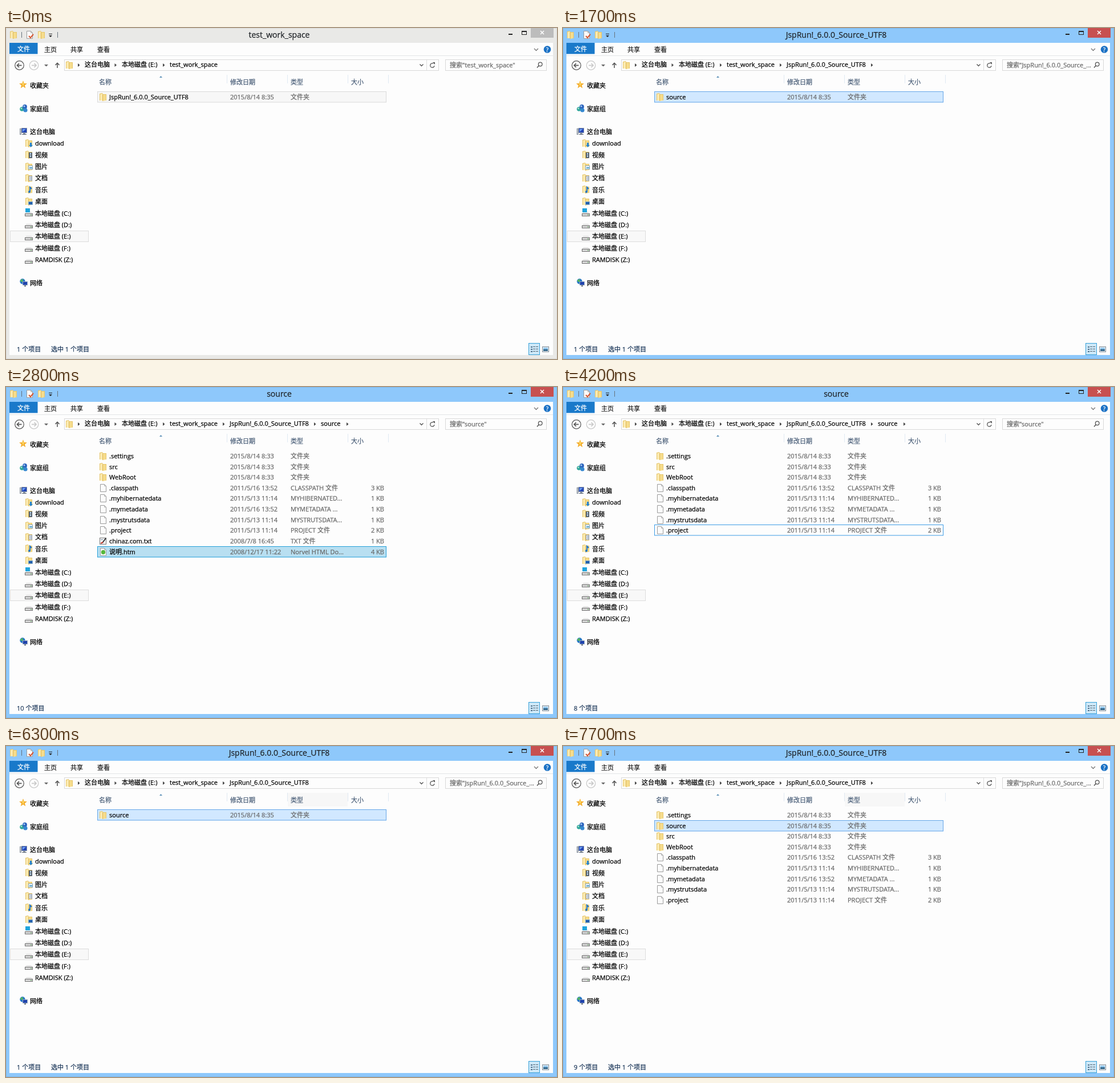
Animation, 966 px wide and 580 px high, one loop 8 s. Source, as an HTML page with a canvas:

```html
<!DOCTYPE html>
<html lang="zh-CN">
<head>
<meta charset="utf-8">
<title>Folder window</title>
<style>
html, body { margin: 0; width: 100%; height: 100%; overflow: hidden; background: #fdfdfd; }
canvas { display: block; width: 966px; height: 580px; }
</style>
</head>
<body>
<canvas id="stage" width="966" height="580"></canvas>
<script>
const g = document.getElementById('stage').getContext('2d');
const FONT = '"Open Sans", "Noto Sans CJK SC", "Noto Sans CJK", "Noto Sans", sans-serif';
const LOOP = 8000;
const PAPER = '#fdfdfd';
const ROW = 18.62;
const DIM = '#686868';

// ---- data ----
const crumbs = ['这台电脑', '本地磁盘 (E:)', 'test_work_space', 'JspRun!_6.0.0_Source_UTF8', 'source'];
const crumbX = [138, 203, 287, 392, 552];
const arrowX = [126, 190.5, 275, 380, 540, 597];

const folder = (name, time) => ({ icon: 'folder', name, date: '2015/8/14 ' + time, type: '文件夹', size: '' });
const file = (name, date, type, kb, icon = 'page') => ({ icon, name, date, type, size: kb + ' KB' });

const project = [folder('JspRun!_6.0.0_Source_UTF8', '8:35')];
const source = [folder('source', '8:35')];
const kept = [
  folder('.settings', '8:33'),
  folder('src', '8:33'),
  folder('WebRoot', '8:33'),
  file('.classpath', '2011/5/16 13:52', 'CLASSPATH 文件', 3),
  file('.myhibernatedata', '2011/5/13 11:14', 'MYHIBERNATED...', 1),
  file('.mymetadata', '2011/5/16 13:52', 'MYMETADATA ...', 1),
  file('.mystrutsdata', '2011/5/13 11:14', 'MYSTRUTSDATA...', 1),
  file('.project', '2011/5/13 11:14', 'PROJECT 文件', 2)
];
const full = [
  ...kept,
  file('chinaz.com.txt', '2008/7/8 16:45', 'TXT 文件', 1, 'note'),
  file('说明.htm', '2008/12/17 11:22', 'Norvel HTML Do...', 4, 'web')
];
const merged = [kept[0], source[0], ...kept.slice(1)];

// fill and border of a highlighted row
const looks = {
  idle: ['#f7f7f7', '#dadada'],
  hover: ['#e5f3fb', '#70c0e7'],
  picked: ['#cbe8f6', '#26a0da'],
  hot: ['#d1e8ff', '#66a7e8'],
  down: ['#b8dff1', '#26a0da'],
  focus: [PAPER, '#3c9be5']
};
const every = (look, count, skip = -1) =>
  Object.fromEntries([...Array(count).keys()].filter(i => i !== skip).map(i => [i, look]));

// each entry changes part of the state from its time on
const script = [
  [0, { active: 0, depth: 3, tail: false, rows: project, marks: { 0: 'idle' }, count: 1, chosen: 1,
        size: '', cut: false, headHover: false, crumbHover: -1 }],
  [200, { marks: { 0: 'hover' } }],
  [300, { marks: { 0: 'hot' } }],
  [500, { active: 0.35, marks: { 0: 'hover' }, chosen: 0 }],
  [600, { active: 0.75 }],
  [700, { active: 1 }],
  [1000, { marks: { 0: 'hot' }, chosen: 1 }],
  [1100, { depth: 4, rows: [], marks: {}, chosen: 0 }],
  [1200, { rows: source, marks: { 0: 'hover' } }],
  [1400, { tail: true }],
  [1700, { marks: { 0: 'hot' }, chosen: 1 }],
  [1800, { depth: 5, tail: false, rows: [], marks: {}, chosen: 0 }],
  [1900, { rows: full, count: 10 }],
  [2000, { marks: { 0: 'hover' } }],
  [2100, { tail: true, marks: { 2: 'hover' } }],
  [2200, { marks: { 4: 'hover' } }],
  [2300, { marks: { 6: 'hover' } }],
  [2400, { marks: { 8: 'hover' } }],
  [2500, { marks: { 9: 'hover' } }],
  [2800, { marks: { 9: 'down' } }],
  [2900, { marks: { 9: 'hot' }, chosen: 1 }],
  [3000, { marks: { 8: 'hover', 9: 'picked' } }],
  [3100, { marks: { 8: 'down', 9: 'picked' } }],
  [3200, { marks: { 8: 'hot', 9: 'picked' }, chosen: 2 }],
  [3500, { size: '3.31 KB' }],
  [4100, { rows: kept, marks: {}, count: 8, chosen: 0, size: '' }],
  [4200, { marks: { 7: 'focus' } }],
  [5100, { marks: every('picked', 8), chosen: 8 }],
  [5500, { cut: true }],
  [5900, { crumbHover: 3 }],
  [6100, { depth: 4, tail: false, rows: [], marks: {}, count: 1, chosen: 0, cut: false, crumbHover: -1 }],
  [6200, { rows: source, marks: { 0: 'hot' }, chosen: 1 }],
  [6300, { headHover: true }],
  [6500, { tail: true, marks: { 0: 'focus' }, chosen: 0 }],
  [6600, { marks: {} }],
  [7000, { rows: merged, count: 9 }],
  [7100, { marks: every('picked', 9, 1), chosen: 8 }],
  [7600, { marks: { 1: 'hover' }, chosen: 0 }],
  [7700, { marks: { 1: 'hot' }, chosen: 1 }]
];

// ---- drawing helpers ----
function box(x, y, w, h, fill, edge) {
  if (fill) { g.fillStyle = fill; g.fillRect(x, y, w, h); }
  if (edge) { g.strokeStyle = edge; g.lineWidth = 1; g.strokeRect(x + 0.5, y + 0.5, w - 1, h - 1); }
}
function path(points, close) {
  g.beginPath();
  for (let i = 0; i < points.length; i += 2) g.lineTo(points[i], points[i + 1]);
  if (close) g.closePath();
}
function poly(fill, ...points) { path(points, true); g.fillStyle = fill; g.fill(); }
function line(color, width, ...points) {
  path(points);
  g.strokeStyle = color; g.lineWidth = width; g.stroke();
}
function disc(x, y, r, fill) {
  g.beginPath(); g.arc(x, y, r, 0, 7); g.fillStyle = fill; g.fill();
}
function ring(x, y, r, color, width, from = 0, to = 2 * Math.PI) {
  g.beginPath(); g.arc(x, y, r, from, to);
  g.strokeStyle = color; g.lineWidth = width; g.stroke();
}
// y is the middle of the line of text; a hairline stroke gives it more weight
function text(s, x, y, color = '#000', size = 11, align = 'left') {
  const base = Math.round(y + size * 0.4);
  g.font = size + 'px ' + FONT;
  g.textAlign = align;
  g.fillStyle = g.strokeStyle = color;
  g.lineWidth = 0.25;
  g.fillText(s, x, base);
  g.strokeText(s, x, base);
}
function mix(a, b, k) {
  return 'rgb(' + a.map((v, i) => Math.round(v + (b[i] - v) * k)).join(',') + ')';
}

// ---- icons, drawn from their top left corner ----
const icons = {
  folder(x, y) {
    poly('#e6c569', x, y + 1, x + 5, y, x + 6, y + 2, x + 12, y + 2, x + 12, y + 13, x, y + 13);
    poly('#fbeab0', x + 1, y + 2, x + 5, y + 1, x + 5, y + 13, x + 1, y + 13);
    poly('#f6dc8c', x + 6, y + 3, x + 11, y + 3, x + 11, y + 13, x + 6, y + 14);
    line('#dcb758', 1, x + 5.5, y + 3, x + 5.5, y + 14);
  },
  page(x, y) {
    path([x + 2.5, y + 0.5, x + 9.5, y + 0.5, x + 12.5, y + 3.5, x + 12.5, y + 13.5, x + 2.5, y + 13.5], true);
    g.fillStyle = '#fcfcfc'; g.fill();
    g.strokeStyle = '#9a9a9a'; g.lineWidth = 1; g.stroke();
    line('#b0b0b0', 1, x + 9.5, y + 1, x + 9.5, y + 3.5, x + 12, y + 3.5);
  },
  note(x, y) {
    box(x + 1, y + 1, 12, 12, '#f4f5f7', '#777');
    line('#333', 2, x + 6, y + 10, x + 12, y + 2);
    line('#c33b32', 2, x + 3, y + 11, x + 7, y + 9);
    line('#7790a6', 1, x + 3, y + 4.5, x + 7, y + 4.5);
  },
  web(x, y) { icons.page(x, y); disc(x + 7.5, y + 7.5, 3.7, '#55b83c'); },
  drive(x, y) {
    poly('#e6e6e6', x + 3, y, x + 11, y, x + 14, y + 3, x, y + 3);
    box(x, y + 3, 14, 5, '#dadada', '#6c6c6c');
    box(x + 10, y + 5, 2, 1, '#4a9e4a');
  },
  system(x, y) {
    icons.drive(x, y + 5);
    box(x + 1, y - 1, 8, 7, '#20a5dc');
  },
  screen(x, y) {
    box(x, y + 1, 3, 11, '#d1d6dc', '#89929d');
    box(x + 3, y, 10, 9, '#2345b5', '#8795ab');
    poly('#6d9ff0', x + 5, y + 2, x + 11, y + 2, x + 5, y + 7);
    box(x + 6, y + 9, 4, 2, '#8993a0');
    box(x + 4, y + 11, 8, 1, '#5f6875');
  },
  star(x, y) {
    const p = [];
    for (let i = 0; i < 10; i++) {
      const r = i % 2 ? 3.1 : 7.3, a = i * Math.PI / 5;
      p.push(x + 7 + r * Math.sin(a), y + 7 - r * Math.cos(a));
    }
    poly('#f4ac2b', ...p);
    poly('#fbd35c', x + 7, y + 2, x + 9, y + 6, x + 7, y + 10, x + 5, y + 6);
  },
  group(x, y) {
    disc(x + 4, y + 8, 3.8, '#2fa59b');
    disc(x + 9, y + 4, 3.9, '#2b63bd');
    disc(x + 10, y + 10, 3.6, '#3688d0');
    disc(x + 8, y + 3, 1.5, '#a9cff5');
    disc(x + 3, y + 7, 1.3, '#b5e7cf');
  },
  network(x, y) {
    disc(x + 5, y + 5, 4.7, '#2676c7');
    poly('#57b85b', x + 2, y + 2, x + 6, y + 1, x + 5, y + 6, x + 1, y + 5);
    box(x + 5, y + 5, 9, 7, '#1f42ad', '#9aa9bd');
    box(x + 8, y + 12, 3, 2, '#66707d');
  }
};
function badge(kind, x, y) {
  icons.folder(x, y);
  const bx = x + 6, by = y + 6;
  if (kind === 'down') {
    poly('#2583d1', bx + 2, by, bx + 5, by, bx + 5, by + 4, bx + 7, by + 4, bx + 3.5, by + 8, bx, by + 4, bx + 2, by + 4);
  } else if (kind === 'film') {
    box(bx, by - 3, 6, 10, '#566270'); box(bx + 2, by - 2, 2, 3, '#bad4e8'); box(bx + 2, by + 2, 2, 3, '#bad4e8');
  } else if (kind === 'photo') {
    box(bx - 1, by - 1, 8, 7, '#f8fafc', '#85a3b9'); box(bx + 1, by + 2, 5, 2, '#4b9fca');
  } else if (kind === 'paper') {
    box(bx, by - 3, 6, 9, '#f8f8f8', '#9aa2aa');
    for (let i = 0; i < 3; i++) box(bx + 2, by - 1 + 2 * i, 3, 1, '#7d96b1');
  } else if (kind === 'music') {
    line('#2476c6', 2, bx + 2, by + 5, bx + 2, by - 3, bx + 5, by);
    disc(bx + 1, by + 5, 2, '#2476c6');
  } else {
    box(bx - 1, by + 1, 8, 6, '#215fac', '#85adcf');
  }
}

const places = [
  ['download', 'down'], ['视频', 'film'], ['图片', 'photo'], ['文档', 'paper'], ['音乐', 'music'], ['桌面', 'desk'],
  ['本地磁盘 (C:)'], ['本地磁盘 (D:)'], ['本地磁盘 (E:)'], ['本地磁盘 (F:)'], ['RAMDISK (Z:)']
];

// ---- parts of the window ----
function drawFrame(s) {
  const frame = mix([233, 233, 231], [142, 200, 251], s.active);
  box(0, 0, 966, 580, frame, mix([218, 218, 216], [126, 183, 232], s.active));
  box(6, 26, 953, 547, PAPER);
  icons.folder(7, 5);
  box(27, 7, 1, 10, '#66717c');
  icons.page(34, 5);
  line('#d65735', 2, 40, 14, 43, 17, 48, 11);
  icons.folder(56, 5);
  box(75, 10, 6, 1, '#222');
  poly('#222', 75, 13, 81, 13, 78, 16);
  box(90, 7, 1, 10, '#66717c');
  text(crumbs[s.depth - 1], 479, 11.5, '#202428', 14, 'center');
  box(881, 10, 7, 2, '#222');
  box(904, 5, 9, 7, null, '#222');
  box(904, 5, 9, 2, '#222');
  box(920, 0, 40, 17, mix([188, 188, 188], [199, 80, 80], s.active));
  line('#fff', 1.5, 937, 5, 943, 11);
  line('#fff', 1.5, 943, 5, 937, 11);
}

function drawRibbon() {
  box(6, 26, 49.5, 19.5, '#1979ca');
  text('文件', 31, 37, '#fff', 11, 'center');
  text('主页', 67, 38, '#222');
  text('共享', 113, 38, '#222');
  text('查看', 160, 38, '#222');
  box(6, 48, 953, 1, '#e3e5e7');
  line('#777', 1.3, 926, 36, 929.5, 39.5, 933, 36);
  disc(949, 37.5, 6.3, '#1c72c5');
  text('?', 949, 37.5, '#fff', 10, 'center');
}

function navArrow(x, color) {
  ring(x, 65.5, 7.8, color, 1.2);
  line(color, 1.7, x + 4, 65.5, x - 4, 65.5);
}

function drawAddress(s) {
  navArrow(23.5, '#555');
  line('#555', 1.7, 23, 62, 19.5, 65.5, 23, 69);
  navArrow(49, '#c8c8c8');
  line('#c8c8c8', 1.7, 49.5, 62, 53, 65.5, 49.5, 69);
  poly('#666', 67, 64, 74, 64, 70.5, 67.5);
  line('#555', 1.6, 90, 70, 90, 61.5);
  line('#555', 1.6, 86.5, 65, 90, 61.5, 93.5, 65);

  box(102, 55, 657, 20, PAPER, '#d9d9d9');
  icons.folder(105, 58);
  if (s.crumbHover >= 0) box(crumbX[s.crumbHover] - 4, 56, 147, 18, '#e5f3fb', '#70c0e7');
  const arrows = s.depth + (s.tail ? 1 : 0);
  for (let i = 0; i < arrows; i++) poly('#444', arrowX[i], 62, arrowX[i] + 3.5, 65, arrowX[i], 68);
  for (let i = 0; i < s.depth; i++) text(crumbs[i], crumbX[i], 64);
  line('#555', 1.4, 725.5, 63.5, 728.5, 66.5, 731.5, 63.5);
  box(737, 56, 1, 18, '#dedede');
  ring(747.5, 65.5, 3.7, '#555', 1.3, 0.2, 5.2);
  poly('#555', 748, 60, 752, 60, 752, 64);

  box(770, 55, 178, 20, PAPER, '#d9d9d9');
  const query = s.depth === 4 ? 'JspRun!_6.0.0_Source_...' : crumbs[s.depth - 1] + '"';
  text('搜索"' + query, 778, 65, DIM);
  ring(936.7, 63.5, 3.3, '#555', 1.3);
  line('#555', 1.6, 934.3, 66, 931, 69.5);
}

function drawSidebar() {
  box(7, 355, 138, 20, '#f8f8f8', '#dcdcdc');
  icons.star(23, 92.5);
  text('收藏夹', 42, 100.5);
  icons.group(24, 134);
  text('家庭组', 42, 141.5);
  icons.screen(24, 175);
  text('这台电脑', 42, 182);
  places.forEach(([name, kind], i) => {
    const y = 202 + 20.35 * i, top = Math.round(y) - 7;
    if (kind) badge(kind, 34, top);
    else if (name.includes('C:')) icons.system(33, top);
    else icons.drive(33, top + 6);
    text(name, 51, y);
  });
  icons.network(24, 439);
  text('网络', 42, 446.5);
}

function drawHeader(s) {
  if (s.headHover) box(494, 82, 105, 24, '#f7f7f7');
  const titles = { 名称: 163, 修改日期: 393, 类型: 499, 大小: 605 };
  for (const name in titles) text(name, titles[name], 95, '#4c607a');
  for (const x of [387, 493, 599, 670]) box(x, 82, 1, 15, '#e0e9f2');
  poly('#5d91b8', 269, 87, 271.5, 84, 274, 87);
}

function drawRows(s) {
  s.rows.forEach((r, i) => {
    const top = Math.round(111 + ROW * i), y = top + 10;
    const look = looks[s.marks[i]];
    if (look) box(160, top, 507, 19.5, look[0], look[1]);
    g.globalAlpha = s.cut ? 0.5 : 1;
    icons[r.icon](r.icon === 'folder' ? 164 : 163, top + 3);
    g.globalAlpha = 1;
    text(r.name, 181, y);
    text(r.date, 393, y, DIM);
    text(r.type, 499, y, DIM);
    text(r.size, 663, y, DIM, 11, 'right');
  });
}

function drawStatus(s) {
  const ink = '#1e395b', wide = s.count > 9 ? 6 : 0;
  text(s.count + ' 个项目', 19, 563, ink);
  if (s.chosen) text('选中 ' + s.chosen + ' 个项目', 79 + wide, 563, ink);
  if (s.size) text(s.size, 203, 563, ink, 11, 'right');
  box(916, 552, 20, 21, '#cde8f8', '#35a0d8');
  for (let i = 0; i < 3; i++) {
    const y = 558 + 4 * i;
    box(920, y, 3, 2, '#56758f');
    box(924, y, 4, 1, '#53626f');
    box(929, y, 4, 1, '#53626f');
  }
  box(940, 558, 12, 10, '#f6f8fa', '#7c8a96');
  box(942, 560, 8, 3, '#92c7ed');
  box(942, 563, 8, 3, '#2d6287');
}

function stateAt(t) {
  const s = {};
  for (const [at, change] of script) if (at <= t) Object.assign(s, change);
  return s;
}

function draw(now) {
  const s = stateAt((now - start) % LOOP);
  drawFrame(s);
  drawRibbon();
  drawAddress(s);
  drawSidebar();
  drawHeader(s);
  drawRows(s);
  drawStatus(s);
}

const start = performance.now();
function tick() {
  draw(performance.now());
  requestAnimationFrame(tick);
}
tick();
</script>
</body>
</html>
```
